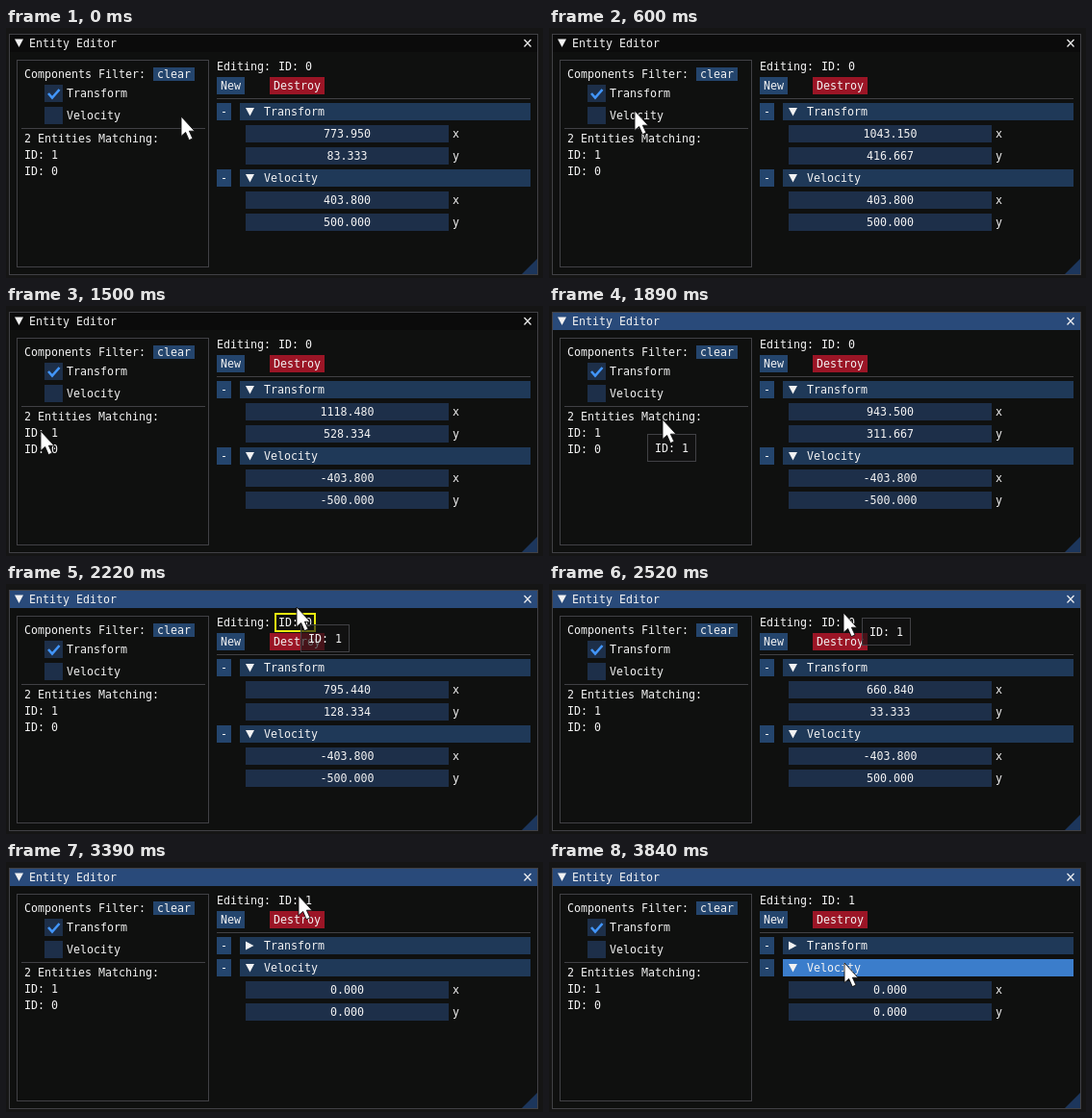
These frames come from a looping animation (558x260 px, 3.87 s). An HTML page:

```html
<!DOCTYPE html>
<html lang="en">
<head>
<meta charset="utf-8">
<title>Entity Editor</title>
<style>
  html, body { margin: 0; width: 100%; height: 100%; overflow: hidden; background: #151515; }
  svg { display: block; }
  text { font: 11.63px "DejaVu Sans Mono", "Liberation Mono", monospace; fill: #f2f2f2; white-space: pre; }
</style>
</head>
<body>
<svg id="stage" width="558" height="260" viewBox="0 0 558 260"></svg>
<script>
const LOOP = 3870, STEP = 30, LAG = 60;
const PRESS = 1590, DRAG = 1740, DROP = 3150;
const C = {
  frame: '#1d2f49', frameHot: '#22466f', button: '#24456d', header: '#1f3958', headerHot: '#3b7dcb',
  red: '#9b1526', redHot: '#c23a48', line: '#414145', title: '#0b0b0b', titleOn: '#294a7a'
};

// Pointer path: time, x, y
const PATH = [
  [0, 182, 92], [210, 115, 133], [390, 52, 134], [540, 78, 108], [600, 89, 86],
  [720, 92, 50], [870, 75, 60], [1050, 48, 128], [1200, 36, 132], [1500, 36, 130],
  [1680, 36, 131], [1860, 100, 122], [2040, 235, 70], [2160, 289, 33], [2220, 302, 24],
  [2340, 312, 18], [2520, 306, 30], [2640, 304, 34], [3360, 304, 34],
  [3690, 307, 98], [3840, 307, 105]
];

const stage = document.getElementById('stage');

function add(name, attrs, parent = stage) {
  const el = document.createElementNS('http://www.w3.org/2000/svg', name);
  for (const k in attrs) el.setAttribute(k, attrs[k]);
  parent.append(el);
  return el;
}
const box = (x, y, w, h, fill, parent) => add('rect', { x, y, width: w, height: h, fill }, parent);
const outline = (x, y, w, h, parent) =>
  add('rect', { x: x + .5, y: y + .5, width: w, height: h, fill: 'none', stroke: C.line }, parent);
const shape = (d, fill, parent) => add('path', { d, fill }, parent);
const show = (el, on) => el.setAttribute('visibility', on ? 'visible' : 'hidden');
const paint = (el, fill) => el.setAttribute('fill', fill);
const inside = (p, x, y, w, h) => p.x >= x && p.x < x + w && p.y >= y && p.y < y + h;

// y is the middle of the line
function label(str, x, y, parent, anchor = 'start') {
  const el = add('text', { x, y: y + 4, 'text-anchor': anchor }, parent);
  el.textContent = str;
  return el;
}
function arrow(x, y, open, parent) {
  const d = open ? `M${x} ${y - 4}h9l-4.5 8.5z` : `M${x} ${y - 4.5}v9l8.5 -4.5z`;
  return shape(d, '#f2f2f2', parent);
}
function button(str, x, y, w, h, fill, parent) {
  const bg = box(x, y, w, h, fill, parent);
  label(str, x + 4, y + h / 2, parent);
  return bg;
}
function checkbox(str, y, checked) {
  const bg = box(40, y, 19, 18, C.frame);
  if (checked) add('path', { d: `M44 ${y + 9}l4 4.5l7.5 -8.5`, fill: 'none', stroke: '#4296fa', 'stroke-width': 2.6 });
  label(str, 63, y + 9);
  return bg;
}
function header(str, y, open, parent) {
  button('-', 219, y, 15, 18, C.button, parent);
  const bg = box(243, y, 302, 18, C.header, parent);
  arrow(249, y + 9, open, parent);
  label(str, 268, y + 9, parent);
  return bg;
}
function field(name, y, value, parent) {
  box(249, y, 211, 18, C.frame, parent);
  label(name, 464, y + 9, parent);
  return label(value, 354.5, y + 9, parent, 'middle');
}

// Window
box(0, 0, 558, 260, '#151515');
box(3, 7, 550, 250, '#0f100f');
const titleBar = box(3, 7, 550, 18, C.title);
outline(3, 6, 549, 250);
arrow(9, 15.5, true);
label('Entity Editor', 24, 16);
add('path', { d: 'M538.5 12l7 7.5m0 -7.5l-7 7.5', stroke: '#f2f2f2', 'stroke-width': 1.2 });
shape('M552 240v16h-16z', '#1c365c');

// Filter panel
outline(11, 33, 199, 215);
label('Components Filter:', 19, 48);
button('clear', 153, 41, 43, 14, C.button);
const checks = [
  { y: 59, bg: checkbox('Transform', 59, true) },
  { y: 82, bg: checkbox('Velocity', 82, false) }
];
box(16, 104, 191, 1, C.line);
label('2 Entities Matching:', 19, 115);
label('ID: 1', 19, 132);
label('ID: 0', 19, 149);

// Entity panel
label('Editing:', 219, 40);
const idText = label('ID: 0', 283, 40);
button('New', 219, 51, 29, 18, C.button);
const destroy = button('Destroy', 274, 51, 57, 18, C.red);
box(219, 73, 326, 1, C.line);

const first = add('g', {});
header('Transform', 78, true, first);
const posX = field('x', 101, '', first), posY = field('y', 124, '', first);
header('Velocity', 147, true, first);
const velX = field('x', 170, '', first), velY = field('y', 193, '', first);

const second = add('g', {});
const heads = [
  { y: 78, bg: header('Transform', 78, false, second) },
  { y: 101, bg: header('Velocity', 101, true, second) }
];
field('x', 124, '0.000', second);
field('y', 147, '0.000', second);

// Drag feedback and pointer
const target = add('rect', { x: 280, y: 31, width: 41, height: 18, fill: 'none', stroke: '#e8ea10', 'stroke-width': 2 });
const tip = add('g', {});
box(0, 0, 50, 29, 'rgba(18,18,18,.62)', tip);
outline(0, 0, 50, 28, tip);
label('ID: 1', 8, 15, tip);
const pointer = shape('M0 0V20.5L4.6 16.4L8.2 24.6L12 23L8.4 15.2H14z', '#fff');
pointer.setAttribute('stroke', '#111');
pointer.setAttribute('stroke-width', .9);

// Monotone cubic through the path points
function slope(i, k) {
  if (i < 1 || i > PATH.length - 2) return 0;
  const [a, b, c] = [PATH[i - 1], PATH[i], PATH[i + 1]];
  const l = (b[k] - a[k]) / (b[0] - a[0]), r = (c[k] - b[k]) / (c[0] - b[0]);
  return l * r > 0 ? 2 * l * r / (l + r) : 0;
}
function pointerAt(t) {
  t = Math.min(Math.max(t, 0), PATH[PATH.length - 1][0]);
  let i = 0;
  while (i < PATH.length - 2 && t >= PATH[i + 1][0]) i++;
  const a = PATH[i], b = PATH[i + 1], d = b[0] - a[0], u = (t - a[0]) / d, v = 1 - u;
  const at = k => v * v * (1 + 2 * u) * a[k] + u * u * (3 - 2 * u) * b[k]
    + d * u * v * (v * slope(i, k) - u * slope(i + 1, k));
  return { x: at(1), y: at(2) };
}

// Body bouncing inside 1280 x 720 at 60 ticks per second
function bodyAt(n) {
  const vx = 403.8, vy = 500;
  const right = n < 76, rising = n >= 77 && n < 164;
  return {
    x: right ? 773.95 + n * vx / 60 : 1280 - (n - 76) * vx / 60,
    y: rising ? 720.0004 - (n - 77) * vy / 60 : n < 77 ? 83.3333 + n * vy / 60 : (n - 164) * vy / 60,
    vx: right ? vx : -vx,
    vy: rising ? -vy : vy
  };
}

function draw(time) {
  const t = Math.floor(time % LOOP / STEP) * STEP;
  const hand = pointerAt(t), seen = pointerAt(t - LAG);
  const dropped = t >= DROP, dragging = t >= DRAG && !dropped;
  const free = t < PRESS || dropped;
  const body = bodyAt(t / 15);

  paint(titleBar, t >= PRESS ? C.titleOn : C.title);
  idText.textContent = dropped ? 'ID: 1' : 'ID: 0';
  posX.textContent = body.x.toFixed(3);
  posY.textContent = body.y.toFixed(3);
  velX.textContent = body.vx.toFixed(3);
  velY.textContent = body.vy.toFixed(3);
  show(first, !dropped);
  show(second, dropped);

  for (const c of checks) paint(c.bg, free && inside(seen, 40, c.y, 86, 18) ? C.frameHot : C.frame);
  for (const h of heads) paint(h.bg, dropped && inside(seen, 243, h.y, 302, 18) ? C.headerHot : C.header);
  paint(destroy, free && inside(seen, 274, 51, 57, 18) ? C.redHot : C.red);

  show(tip, dragging);
  show(target, dragging && inside(seen, 279, 30, 43, 20));
  tip.setAttribute('transform', `translate(${Math.round(seen.x) + 17} ${Math.round(seen.y) + 9})`);
  pointer.setAttribute('transform', `translate(${Math.round(hand.x)} ${Math.round(hand.y)})`);
}

const start = performance.now();
function loop() {
  draw(performance.now() - start);
  requestAnimationFrame(loop);
}
loop();
</script>
</body>
</html>
```
